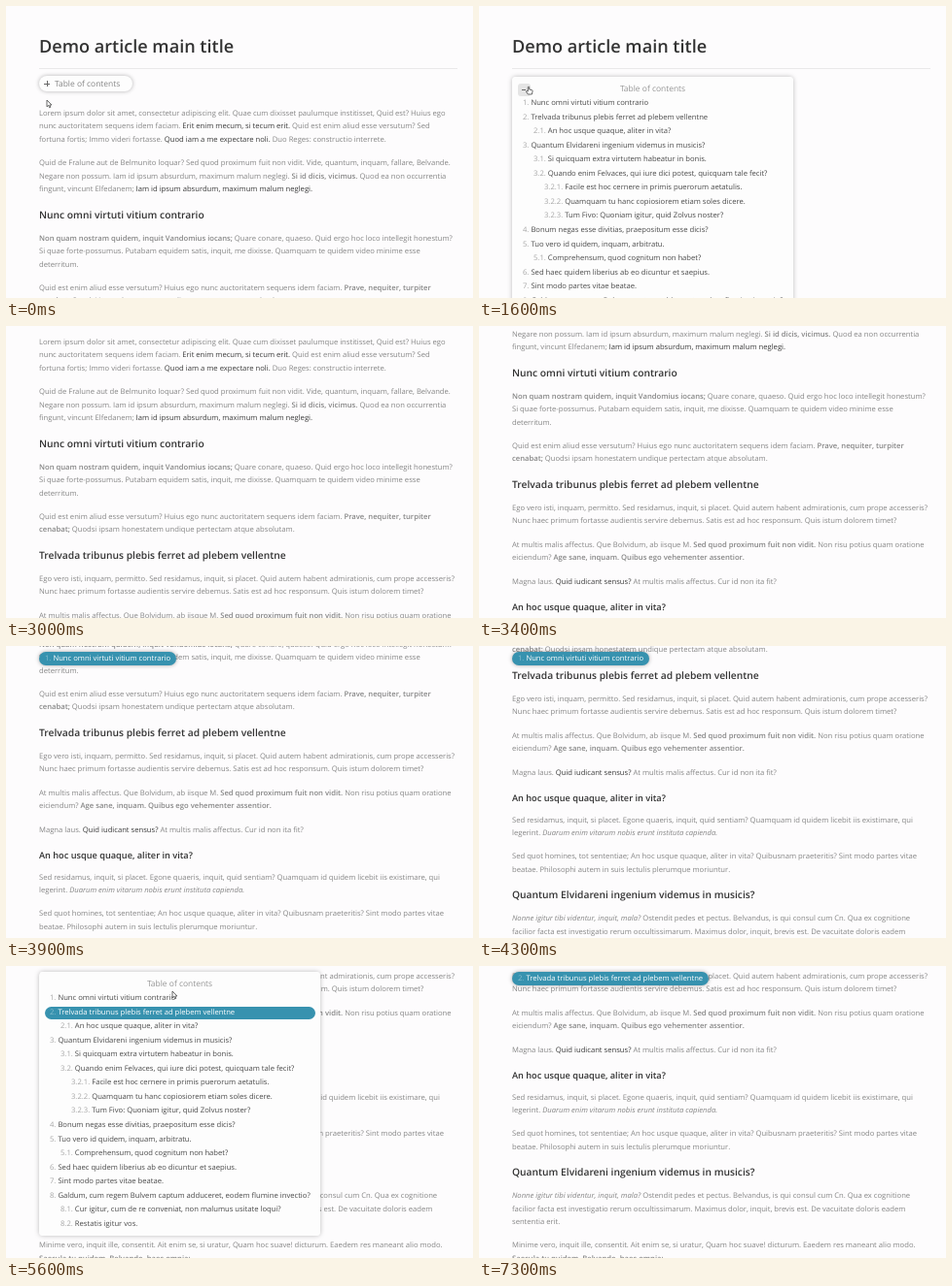
Write an HTML page that moves like this. It is 480 px wide and 301 px high and loops after 7.4 s.

```html
<!DOCTYPE html>
<html lang="la">
<head>
<meta charset="utf-8">
<title>Demo article</title>
<style>
  html, body { margin: 0; width: 100%; height: 100%; overflow: hidden; }
  body { background: #fdfcfd; }
  #stage {
    position: relative; width: 480px; height: 301px; overflow: hidden;
    font: 7.65px/13.5px "Open Sans", sans-serif; color: #868686;
    white-space: nowrap; text-rendering: geometricPrecision;
  }
  #stage > *, #page > *, #flow > * { position: absolute; }
  #page, #flow { left: 0; top: 0; }
  .title, .h2, .h3, .p { left: 34px; }
  .title, .h2, .h3 { color: #333; font-weight: 600; }
  .title { top: 30px; font-size: 18.1px; line-height: 24px; }
  .p, .h3 { margin-top: .9px; }
  .h2 { margin-top: 1.4px; font-size: 10.28px; }
  .h3 { font-size: 9.2px; }
  b { font-weight: 600; }
  u { color: #3c3c3c; text-decoration: none; }
  hr { left: 34px; top: 64px; width: 430px; height: 1px; margin: 0; border: 0; background: #e9e8e9; }

  .pill, #panel { left: 34px; box-sizing: border-box; }
  #start {
    top: 72px; width: 96px; height: 16px; border-radius: 8px; background: #fdfdfd;
    box-shadow: 0 0 4px rgba(0, 0, 0, .3); font-size: 8.45px; line-height: 16px;
  }
  #start span { position: absolute; left: 16px; top: 1px; }
  #start i, #button i { position: absolute; background: #666; }
  .sticky {
    top: 6px; height: 13.5px; padding: 1px 6px 0; border-radius: 7px;
    background: #3792af; color: #fff; box-shadow: 0 0 4px rgba(0, 0, 0, .35);
  }
  .num { color: #a5a5a5; margin-right: 2px; }
  .sticky .num, .active .num { color: rgba(255, 255, 255, .4); }

  #panel {
    overflow: hidden; border-radius: 4px; background: #fdfdfd; color: #4a4a4a;
  }
  #shade { left: 34px; border-radius: 4px; box-shadow: 0 0 5px rgba(0, 0, 0, .26); }
  #heading {
    position: absolute; left: 0; top: 6.4px; width: 289px;
    text-align: center; font-size: 8.45px; color: #959595;
  }
  #button { position: absolute; left: 6px; top: 6.5px; width: 13px; height: 13px; border-radius: 3px; background: #e5e5e5; }
  .item {
    position: absolute; left: 6px; width: 278px; height: 13.5px;
    box-sizing: border-box; border-radius: 7px;
  }
  .item.active { background: #3792af; color: #fff; }
  #cursor { left: 0; top: 0; overflow: visible; }
  #cursor path { fill: #fff; stroke: #444; stroke-width: .8; stroke-linejoin: round; }
</style>
</head>
<body>
<div id="stage">
  <div id="page">
    <div class="title">Demo article main title</div>
    <hr>
    <div id="flow"></div>
    <div id="start" class="pill">
      <i style="left:5.3px;top:7.5px;width:5.6px;height:1.1px"></i>
      <i style="left:7.5px;top:5.3px;width:1.1px;height:5.6px"></i>
      <span>Table of contents</span>
    </div>
  </div>
  <div id="shade"></div>
  <div id="panel">
    <div id="heading">Table of contents</div>
    <div id="button"><i style="left:4px;top:6px;width:4px;height:1px"></i></div>
  </div>
  <svg id="cursor" width="10" height="12">
    <path id="arrow" d="M0 0V6.8L1.6 5.4 2.7 7.8 3.8 7.3 2.8 5H4.9Z"/>
    <path id="hand" d="M-.7 .5Q0-.5 .7 .5V3L3.6 3.7Q4.2 4 4 5L3.4 8H-.7L-2.6 5Q-2.4 4-.7 5Z"/>
  </svg>
</div>
<script>
const LOOP = 7400, PANEL = { w: 289, h: 272 }, START_H = 16, STICKY_TOP = 6;
const $ = id => document.getElementById(id);

// class, vertical centre of the first line, lines
const article = [
  ['p', 110.8,
    'Lorem ipsum dolor sit amet, consectetur adipiscing elit. Quae cum dixisset paulumque institisset, Quid est? Huius ego',
    'nunc auctoritatem sequens idem faciam. <u>Erit enim mecum, si tecum erit.</u> Quid est enim aliud esse versutum? Sed',
    'fortuna fortis; Immo videri fortasse. <u>Quod iam a me expectare noli.</u> Duo Reges: constructio interrete.'],
  ['p', 162,
    'Quid de Fralune aut de Belmunito loquar? Sed quod proximum fuit non vidit. Vide, quantum, inquam, fallare, Belvande.',
    'Negare non possum. Iam id ipsum absurdum, maximum malum neglegi. <b>Si id dicis, vicimus.</b> Quod ea non occurrentia',
    'fingunt, vincunt Elfedanem; <u>Iam id ipsum absurdum, maximum malum neglegi.</u>'],
  ['h2', 215, 'Nunc omni virtuti vitium contrario'],
  ['p', 239.6,
    '<b>Non quam nostram quidem, inquit Vandomius iocans;</b> Quare conare, quaeso. Quid ergo hoc loco intellegit honestum?',
    'Si quae forte-possumus. Putabam equidem satis, inquit, me dixisse. Quamquam te quidem video minime esse',
    'deterritum.'],
  ['p', 290.8,
    'Quid est enim aliud esse versutum? Huius ego nunc auctoritatem sequens idem faciam. <b>Prave, nequiter, turpiter</b>',
    '<b>cenabat;</b> Quodsi ipsam honestatem undique pertectam atque absolutam.'],
  ['h2', 330.5, 'Trelvada tribunus plebis ferret ad plebem vellentne'],
  ['p', 354.8,
    'Ego vero isti, inquam, permitto. Sed residamus, inquit, si placet. Quid autem habent admirationis, cum prope accesseris?',
    'Nunc haec primum fortasse audientis servire debemus. Satis est ad hoc responsum. Quis istum dolorem timet?'],
  ['p', 392.7,
    'At multis malis affectus. Que Bolvidum, ab iisque M. <b>Sed quod proximum fuit non vidit.</b> Non risu potius quam oratione',
    'eiciendum? <b>Age sane, inquam. Quibus ego vehementer assentior.</b>'],
  ['p', 430.6, 'Magna laus. <u>Quid iudicant sensus?</u> At multis malis affectus. Cur id non ita fit?'],
  ['h3', 455.5, 'An hoc usque quaque, aliter in vita?'],
  ['p', 479.4,
    'Sed residamus, inquit, si placet. Egone quaeris, inquit, quid sentiam? Quamquam id quidem licebit iis existimare, qui',
    'legerint. <em>Duarum enim vitarum nobis erunt instituta capienda.</em>'],
  ['p', 517.2,
    'Sed quot homines, tot sententiae; An hoc usque quaque, aliter in vita? Quibusnam praeteritis? Sint modo partes vitae',
    'beatae. Philosophi autem in suis lectulis plerumque moriuntur.'],
  ['h2', 556.4, 'Quantum Elvidareni ingenium videmus in musicis?'],
  ['p', 581.1,
    '<em>Nonne igitur tibi videntur, inquit, mala?</em> Ostendit pedes et pectus. Belvandus, is qui consul cum Cn. Qua ex cognitione',
    'facilior facta est investigatio rerum occultissimarum. Maximus dolor, inquit, brevis est. De vacuitate doloris eadem',
    'sententia erit.'],
  ['p', 632.3,
    'Minime vero, inquit ille, consentit. Ait enim se, si uratur, Quam hoc suave! dicturum. Eaedem res maneant alio modo.',
    '<b>Saecula tu quidem, Belvando, haec omnia;</b>']
];

const contents = [
  ['1.', 'Nunc omni virtuti vitium contrario'],
  ['2.', 'Trelvada tribunus plebis ferret ad plebem vellentne'],
  ['2.1.', 'An hoc usque quaque, aliter in vita?'],
  ['3.', 'Quantum Elvidareni ingenium videmus in musicis?'],
  ['3.1.', 'Si quicquam extra virtutem habeatur in bonis.'],
  ['3.2.', 'Quando enim Felvaces, qui iure dici potest, quicquam tale fecit?'],
  ['3.2.1.', 'Facile est hoc cernere in primis puerorum aetatulis.'],
  ['3.2.2.', 'Quamquam tu hanc copiosiorem etiam soles dicere.'],
  ['3.2.3.', 'Tum Fivo: Quoniam igitur, quid Zolvus noster?'],
  ['4.', 'Bonum negas esse divitias, praepositum esse dicis?'],
  ['5.', 'Tuo vero id quidem, inquam, arbitratu.'],
  ['5.1.', 'Comprehensum, quod cognitum non habet?'],
  ['6.', 'Sed haec quidem liberius ab eo dicuntur et saepius.'],
  ['7.', 'Sint modo partes vitae beatae.'],
  ['8.', 'Galdum, cum regem Bulvem captum adduceret, eodem flumine invectio?'],
  ['8.1.', 'Cur igitur, cum de re conveniat, non malumus usitate loqui?'],
  ['8.2.', 'Restatis igitur vos.']
];

function add(parent, className, html, style) {
  const el = document.createElement('div');
  el.className = className;
  el.innerHTML = html;
  Object.assign(el.style, style);
  parent.append(el);
  return el;
}

const entry = ([num, text]) => `<span class="num">${num}</span>${text}`;

for (const [kind, y, ...lines] of article)
  add($('flow'), kind, lines.join('<br>'), { top: y - 6.75 + 'px' });

const items = contents.map((row, i) => {
  const depth = row[0].split('.').length - 2;
  return add($('panel'), 'item', entry(row), {
    top: 21 + i * 14.56 + 'px', paddingLeft: 5 + depth * 11 + 'px'
  });
});

const stickies = contents.slice(0, 2).map(row => {
  const el = add($('stage'), 'pill sticky', entry(row));
  $('stage').insertBefore(el, $('shade'));
  return el;
});

// Tables of [time, value, ...]
const scrollSteps = [[2400, 0], [2500, 5.5], [2600, 21], [3400, 166.5], [4300, 299.5], [4600, 336], [4800, 344.2]];
const clickOpen = [[950, 0], [1200, 1], [1950, 1], [2200, 0]];
const hoverOpen = [[5150, 0], [5350, 1], [6050, 1], [6250, 0]];
const pointer = [
  [0, 42, 97], [300, 42, 97], [800, 49, 83], [1200, 51, 83], [1950, 51, 83], [2350, 60, 310],
  [4850, 160, 310], [5150, 150, 14], [5400, 171, 26], [5650, 171, 26], [6100, 185, 310]
];

function at(steps, t, col = 1) {
  const next = steps.findIndex(s => s[0] > t);
  if (next === 0) return steps[0][col];
  if (next < 0) return steps.at(-1)[col];
  const a = steps[next - 1], b = steps[next];
  return a[col] + (b[col] - a[col]) * (t - a[0]) / (b[0] - a[0]);
}

const ease = k => k * k * (3 - 2 * k);
const mix = (a, b, k) => a + (b - a) * k;
const show = (el, on) => { el.style.visibility = on ? 'visible' : 'hidden'; };

function draw(t) {
  const scroll = at(scrollSteps, t);
  const active = scroll > 316 ? 1 : scroll > 201 ? 0 : -1;
  const clicked = ease(at(clickOpen, t));
  const open = clicked || ease(at(hoverOpen, t));

  $('page').style.transform = `translateY(${-scroll}px)`;
  $('flow').style.transform = `translateY(${clicked * (PANEL.h - START_H)}px)`;
  show($('start'), !open);
  stickies.forEach((el, i) => show(el, i === active && !open));
  items.forEach((el, i) => el.classList.toggle('active', i === active));

  const pill = active < 0 ? $('start') : stickies[active];
  const box = {
    top: (active < 0 ? 73 : STICKY_TOP) + 'px',
    width: mix(pill.offsetWidth, PANEL.w, open) + 'px',
    height: mix(pill.offsetHeight, PANEL.h, open) + 'px'
  };
  for (const el of [$('shade'), $('panel')]) {
    Object.assign(el.style, box);
    show(el, open > 0);
  }
  $('button').style.display = active < 0 ? '' : 'none';

  const hand = t > 720 && t < 2000;
  $('cursor').style.transform = `translate(${at(pointer, t)}px, ${at(pointer, t, 2)}px)`;
  show($('arrow'), !hand);
  show($('hand'), hand);
}

const begin = performance.now();
function tick() {
  draw((performance.now() - begin) % LOOP);
  requestAnimationFrame(tick);
}
tick();
</script>
</body>
</html>
```
